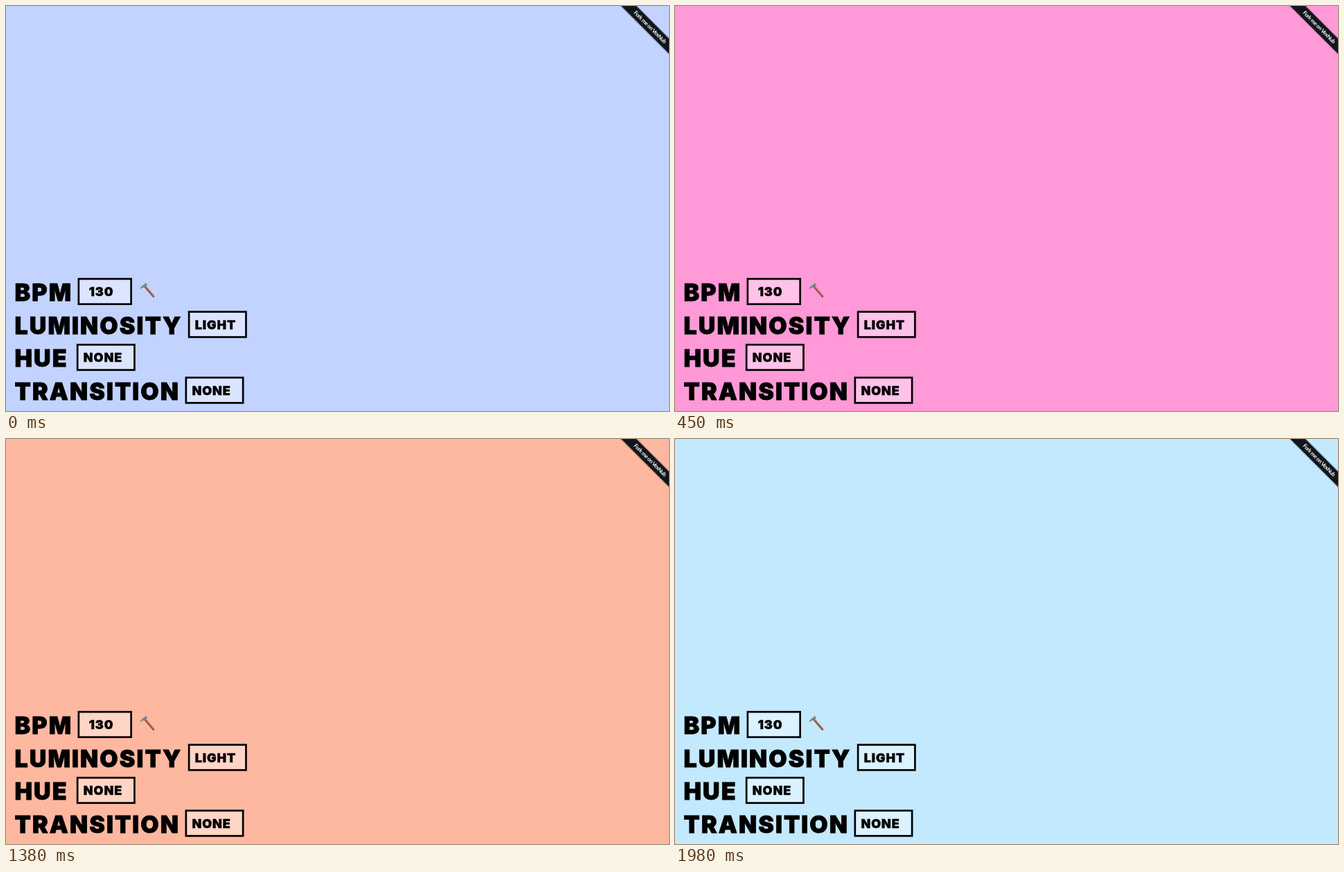
An HTML page for the animation above (2.13 s loop, 957x585 px).

```html
<!DOCTYPE html>
<html lang="en">
<head>
<meta charset="utf-8">
<title>Tempo colours</title>
<style>
  html, body { margin: 0; width: 100%; height: 100%; overflow: hidden; }
  svg { display: block; }
  .label, .value { font-family: Inter, Roboto, sans-serif; font-weight: 900; stroke: #000; }
  .label { font-size: 34px; letter-spacing: 2.1px; stroke-width: .8; }
  .value { font-size: 18px; letter-spacing: .9px; stroke-width: .4; }
  .field { fill: #fff; fill-opacity: .4; stroke: #000; stroke-width: 2.7; }
  .ribbon text { font: bold 8px Lato, sans-serif; letter-spacing: -.45px; fill: #fff; text-anchor: middle; }
</style>
</head>
<body>
<svg width="957" height="585" viewBox="0 0 957 585">
  <g id="rows"></g>

  <g id="hammer" stroke-linecap="round" fill="none">
    <path d="M201 405.500L212.800 419.300" stroke="#7a4636" stroke-width="3"/>
    <path d="M201.500 405.200L213 418.600" stroke="#c07a5c" stroke-width="1.600"/>
    <path d="M193.700 409.300Q194.300 404.200 199 402.600L201.300 399.600L204 402.600L200.800 406.300Q196.800 405.800 193.700 409.300Z" fill="#75828b"/>
    <path d="M195 405.800Q197 402.800 201.300 400.800" stroke="#b4c0c7" stroke-width="1"/>
  </g>

  <g class="ribbon" transform="translate(928.500 29.500) rotate(45)">
    <rect x="-70" y="-9" width="140" height="18" opacity=".15"/>
    <rect x="-70" y="-8.200" width="140" height="16.400" opacity=".35"/>
    <rect x="-70" y="-7.400" width="140" height="14.800" fill="#11151c"/>
    <text x="1.500" y="2.500">Fork me on VexNub</text>
  </g>
</svg>
<script>
  const rows = [
    // label, value, field x, field width, value inset
    ["BPM", "130", 103.5, 78.5, 16.3],
    ["LUMINOSITY", "LIGHT", 262.8, 85, 10],
    ["HUE", "NONE", 101.8, 85, 10],
    ["TRANSITION", "NONE", 258.5, 85, 10],
  ];
  document.getElementById("rows").innerHTML = rows.map(([label, value, x, width, inset], i) => {
    const top = 392.8 + 47.55 * i;
    return `
    <text class="label" x="12.500" y="${top + 33.2}">${label}</text>
    <rect class="field" x="${x + 1.35}" y="${top + 1.35}" width="${width - 2.7}" height="36.500"/>
    <text class="value" x="${x + inset}" y="${top + 26.2}">${value}</text>`;
  }).join("");

  const LOOP = 2130;
  const beats = [[450, "#c3d3ff"], [1050, "#ff99d8"], [1380, "#8763eb"], [1980, "#ffb8a0"], [LOOP, "#c3e9ff"]];
  const start = performance.now();

  function draw() {
    const time = (performance.now() - start) % LOOP;
    document.body.style.background = beats.find(([end]) => time < end)[1];
    requestAnimationFrame(draw);
  }
  draw();
</script>
</body>
</html>
```
